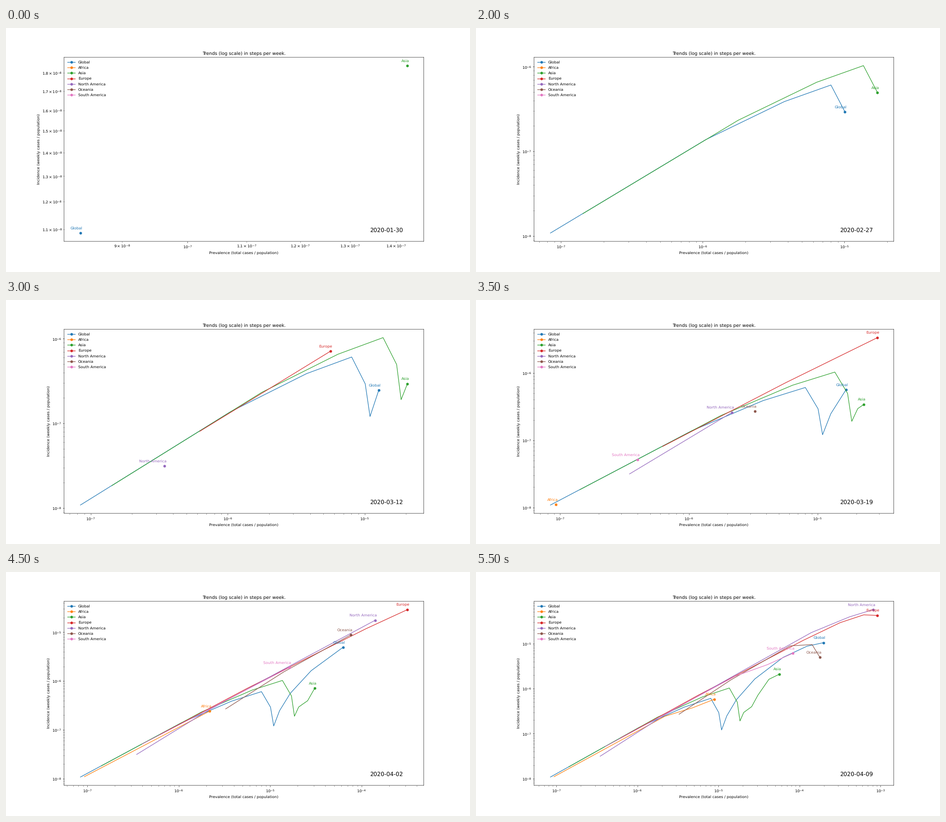
Animation of 1028 by 544 pixels, one loop 10 s. Source, as a matplotlib script:

```python
import matplotlib.pyplot as plt
import numpy as np
from matplotlib.animation import FuncAnimation

W, H = 1028, 544
DPI = W / 17
STEPS, LAST_DATE = 12, 10
FRAMES, INTERVAL = 20, 500
UNIT = 1e-8
WEEKS = np.arange(STEPS)

# name: population share, first prevalence,
#       turning points of the incidence as (week, value)
REGIONS = {
    "Africa": (0.17, 9.3, [(7, 1.105), (8.9, 23.3), (11, 58.2)]),
    "Asia": (0.59, 14.26, [(0, 1.842), (1.28, 47.5), (3.16, 111), (5, 19.1),
                           (6, 29.5), (8.34, 41.7), (10, 161), (11, 210)]),
    "Europe": (0.1, 62.5, [(5, 8.08), (6.31, 140), (8, 1196),
                           (9.47, 4430), (11, 4225)]),
    "North America": (0.08, 34.6, [(6, 3.15), (9.25, 2980), (11, 5690)]),
    "Oceania": (0.005, 326, [(7, 27), (9.3, 1500), (11, 500)]),
    "South America": (0.055, 40, [(7, 5.15), (8.8, 169), (11, 607)]),
}


def incidence(turns):
    """Exponential growth or decay between turning points, zero before."""
    week, value = np.transpose(turns)
    curve = np.exp(np.interp(WEEKS, week, np.log(value)))
    return np.where(WEEKS < week[0], 0, curve)


class Trend:
    """A growing trail with a dot and a name at its head."""

    def __init__(self, ax, name, color, first, weekly):
        self.start = np.argmax(weekly > 0)
        self.y = weekly[self.start:] * UNIT
        # each week adds seven days of the current incidence
        gains = np.append(0, 7 * self.y[1:])
        self.x = first * UNIT + np.cumsum(gains)
        ax.plot([], [], "o-", color=color, label=name)
        self.trail, = ax.plot([], [], color=color)
        self.head, = ax.plot([], [], "o", color=color)
        self.tag = ax.annotate(name, (UNIT, UNIT), xytext=(5, 10),
                               textcoords="offset points", ha="right",
                               color=color, visible=False)

    def show(self, week):
        n = max(week - self.start + 1, 0)
        x, y = self.x[:n], self.y[:n]
        self.trail.set_data(x, y)
        self.head.set_data(x[-1:], y[-1:])
        self.tag.set_visible(n > 0)
        if n:
            self.tag.xy = x[-1], y[-1]


plt.rcParams["text.hinting"] = "none"

# the small surplus keeps the pixel size from being rounded down
fig = plt.figure(figsize=((W + 1e-6) / DPI, (H + 1e-6) / DPI), dpi=DPI,
                 facecolor="white")
fig.subplots_adjust(left=128.7 / W, right=925.6 / W,
                    bottom=1 - 475.8 / H, top=1 - 65.2 / H)
ax = fig.add_subplot()
ax.set_xscale("log")
ax.set_yscale("log")
ax.set_title("Trends (log scale) in steps per week.")
ax.set_xlabel("Prevalence (total cases / population)")
ax.set_ylabel("Incidence (weekly cases / population)")
for spine in ax.spines.values():
    spine.set_snap(False)

curves = {name: (first, incidence(turns))
          for name, (_, first, turns) in REGIONS.items()}
share = {name: region[0] for name, region in REGIONS.items()}
world = sum(share[name] * weekly for name, (_, weekly) in curves.items())
world_first = share["Asia"] * curves["Asia"][0]

trends = [Trend(ax, name, f"C{i}", *curve) for i, (name, curve) in
          enumerate({"Global": (world_first, world), **curves}.items())]
ax.legend(loc="upper left", frameon=False, labelspacing=0.53)
date = ax.text(0.85, 0.05, "", transform=ax.transAxes, fontsize=15)


def draw(frame):
    week = min(frame, STEPS - 1)
    for trend in trends:
        trend.show(week)
    date.set_text(str(np.datetime64("2020-01-30") + 7 * min(week, LAST_DATE)))
    ax.relim()
    ax.autoscale_view()


anim = FuncAnimation(fig, draw, frames=FRAMES, init_func=lambda: draw(0),
                     interval=INTERVAL, repeat=True)
plt.show()
```
